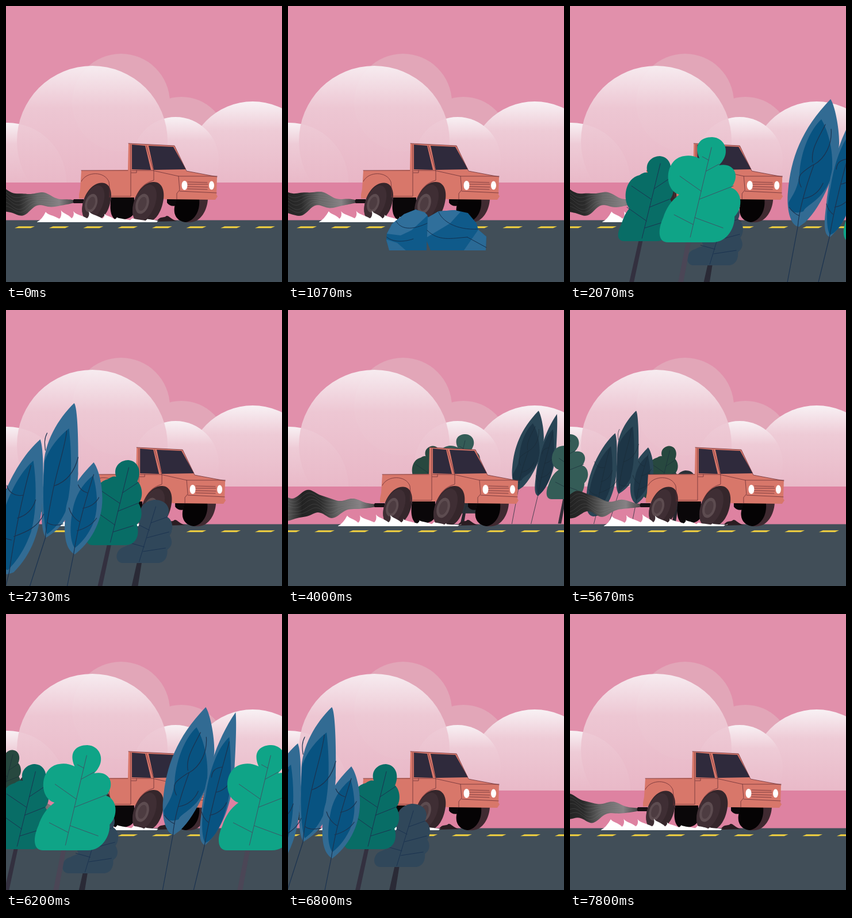
Animation of 480x480 px, one loop 7870 ms. Source, as an HTML page:

```html
<!DOCTYPE html>
<html lang="en">
<head>
<meta charset="utf-8">
<title>Pickup on the road</title>
<style>
  html, body { margin: 0; width: 100%; height: 100%; overflow: hidden; background: #e190ab; }
  svg { display: block; width: 100vw; height: 100vh; }
</style>
</head>
<body>
<svg id="stage" viewBox="0 0 480 480"></svg>
<script>
const LOOP = 7870, FRAME = LOOP / 118, DASH_GAP = 59.7;

const path = (d, fill) => `<path d="${d}" fill="${fill}"/>`;
const line = (d, color, width = 1) =>
  `<path d="${d}" fill="none" stroke="${color}" stroke-width="${width}" stroke-linecap="round" stroke-linejoin="round"/>`;
const ellipse = (x, y, rx, ry, fill, turn = 0) =>
  `<ellipse cx="${x}" cy="${y}" rx="${rx}" ry="${ry}" fill="${fill}" transform="rotate(${turn} ${x} ${y})"/>`;
const group = (x, y, body) => `<g transform="translate(${x} ${y})">${body}</g>`;

function clouds() {
  let defs = '', body = '';
  const puff = (x, y, r) => {
    const id = 'puff' + x;
    defs += `<linearGradient id="${id}" gradientUnits="userSpaceOnUse" x1="0" y1="${y - r}" x2="0" y2="307">
      <stop offset="0" stop-color="#f8f1f4"/><stop offset=".36" stop-color="#eecbd6"/>
      <stop offset="1" stop-color="#e9b9c8"/></linearGradient>`;
    body += ellipse(x, y, r, r, `url(#${id})`);
  };
  const haze = (x, y, r) => { body += ellipse(x, y, r, r, '#e2a6b8'); };
  haze(200, 168, 85);
  haze(305, 238, 80);
  puff(429, 280, 114);
  puff(295, 268, 75);
  puff(2, 306, 103);
  body += '<g opacity=".93">';
  puff(150, 235, 131);
  body += '</g>';
  return `<defs>${defs}<clipPath id="sky"><path d="M0 0H480V307H0Z"/></clipPath></defs>
    <g clip-path="url(#sky)">${body}</g>`;
}

function bigTree(p) {
  return path('M97 405L82 480H91L105 405Z', p.bigTrunk) +
    path('M64 411C47 411 46 390 56 368C61 352 70 338 84 328C56 320 58 266 92 261C102 259 110 261 119 265C108 240 122 228 141 228C163 229 171 252 160 268C158 272 155 274 153 277C176 272 188 290 179 308C178 311 176 313 174 316C194 322 195 352 180 366C181 384 168 411 142 411Z', p.big) +
    line('M140 246L103 402M131 287L153 275M122 322L85 296M119 336L178 313M111 368L160 386M108 380L75 363M135 268L124 262', p.bigVein);
}

function midTree(p) {
  return path('M177 405L160 480H168L184 405Z', p.trunk) +
    path('M152 409C138 409 138 396 146 380C150 368 152 362 160 352C148 336 152 300 178 294Q186 288 192 290C186 272 200 261 213 261C230 262 237 280 229 298C238 306 240 326 231 336C240 350 236 368 228 373C234 392 226 409 208 409Z', p.mid) +
    line('M214 274L182 404M203 318L230 300M198 336L164 313M195 350L230 336M190 374L156 350M187 386L222 375', p.vein);
}

function lowTree(p) {
  return path('M229 436L219 480H230L237 436Z', p.lowTrunk) +
    path('M204 440C188 440 190 416 206 412Q214 408 221 406C214 394 224 384 232 374C230 350 234 334 258 330C282 330 288 348 281 360C292 366 292 384 285 392C292 404 288 412 281 417C282 430 276 440 264 440Z', p.low) +
    line('M261 342L232 438M253 370L281 360M250 383L232 374M246 396L284 386M241 412L216 405M239 420L278 414', p.vein);
}

function leaf(p, outer, inner, veins) {
  return path(outer, p.leafEdge) + path(inner, p.leaf) + line(veins, p.vein, 1.2);
}

function plants(p) {
  const tallPair =
    leaf(p, 'M347 162C354 172 362 210 362 238C360 285 332 348 303 376L292 384C276 382 270 350 273 322C278 265 296 215 347 162Z',
      'M331 197C312 215 296 250 293 290C291 318 280 330 274 342C274 357 284 363 300 357C304 345 333 340 348 298C353 275 350 230 331 197Z',
      'M338 206C326 230 312 250 316 272M348 214C350 240 338 265 318 276C302 320 292 355 290 384L272 480M317 276C296 290 286 295 296 315M300 335C316 332 328 322 334 308M293 365C286 362 279 356 275 350') +
    leaf(p, 'M399 171C401 190 399 235 397 270C393 330 376 375 346 402C334 398 336 375 339 350C345 285 365 220 399 171Z',
      'M388 214C392 260 393 305 382 340C372 375 358 394 346 398C338 385 340 345 347 315C354 270 368 232 388 214Z',
      'M388 222C378 262 358 325 345 402L326 480M376 266C362 268 358 274 357 284M365 310C376 308 386 300 390 290M354 350C366 348 378 340 383 328M351 362C344 356 341 350 340 344');
  const trio =
    leaf(p, 'M119 162C125 168 127 230 126 285C122 350 100 378 70 396C58 380 64 335 66 275C66 230 92 188 119 162Z',
      'M110 206C115 250 116 300 105 348C95 372 82 382 72 390C62 360 66 280 68 262C76 240 92 220 110 206Z',
      'M106 210C104 235 90 275 82 315C76 345 70 375 69 396L42 480M126 256C120 280 108 298 84 306M72 214C66 225 68 235 69 244M100 372C88 376 78 374 73 370') +
    leaf(p, 'M60 225C66 240 66 290 64 330C60 385 45 425 14 456C-18 470 -26 440 -20 390C-14 330 20 260 60 225Z',
      'M48 262C54 300 54 350 44 386C32 420 16 440 4 452C-18 450 -18 410 -10 375C0 330 22 285 48 262Z',
      'M44 270C30 320 16 385 6 456L0 480M30 322C18 325 5 318 2 305M52 330C46 350 34 358 20 362M66 355C56 378 36 386 14 394M10 400C-2 398 -10 392 -14 384') +
    leaf(p, 'M153 265C160 274 168 300 168 328C168 370 146 406 120 425C104 416 100 392 104 352C106 318 130 288 153 265Z',
      'M152 288C160 318 162 350 150 376C140 396 130 406 120 414C110 400 112 370 117 345C122 320 136 300 152 288Z',
      'M153 286C144 315 126 370 118 425L107 480M142 318C134 316 128 310 126 304M162 326C156 338 144 343 134 345M128 368C118 362 112 352 110 344M158 362C150 374 138 380 124 384');
  return group(-163, 0, midTree(p)) + group(-95, 11, lowTree(p)) + bigTree(p) + tallPair +
    group(320, 0, bigTree(p)) +
    group(527, 0, lowTree(p) + midTree(p) + trio);
}

function rocks() {
  const ink = '#12304f';
  return path('M172 396L181 379L202 362L222 354L238 359L248 372L242 390L241 425H177L171 408Z', '#0f5a8a') +
    path('M172 396L181 379L202 362L222 354L238 359L243 364L215 390L196 399Z', '#306f9b') +
    path('M176 425L171 406L190 412L205 425Z', '#2a6a96') +
    line('M188 374C196 388 214 392 246 376M172 402C184 412 204 410 218 405', ink) +
    path('M243 368L262 357L290 355L313 360L328 378L331 389L345 401L344 425H248L241 408Z', '#0f5a8a') +
    path('M243 368L262 357L290 355L300 358L282 378L262 390L242 402Z', '#306f9b') +
    path('M306 425L331 389L345 401L344 425Z', '#2a6a96') +
    line('M262 358C268 374 292 390 330 388M242 390C262 410 284 404 312 402M312 402L345 420', ink);
}

function wheel(x, y, s) {
  return group(x, y, `<g transform="scale(${s})">` +
    path('M-19 12C-18 -12 -2 -37 18 -37C34 -37 38 -18 34 -2C30 18 20 31 8 33H-4C-14 32 -19 24 -19 12Z', '#35262b') +
    ellipse(2, 0, 18, 34, '#3f2e34', 22) +
    ellipse(-2, 1, 11, 18, '#5d4c50', 18) +
    ellipse(-2, 1, 7, 12.5, '#4d3c41', 18) + '</g>');
}

function truck() {
  const ink = '#6b3036', paint = '#d8776a', glass = '#2f2a3c';
  return path('M183 332H223V360C218 370 205 373 190 371C181 366 180 350 183 332Z', '#0a0709') +
    path('M262 375C268 364 274 370 279 365C284 364 286 371 298 374Z', '#2a1d22') +
    path('M280 336H299V345C292 350 284 348 280 342Z', '#0a0709') +
    path('M296 336H351C350 356 338 375 322 376C302 378 292 368 293 352Z', '#402a31') +
    path('M296 336H336C338 356 328 374 312 376C298 374 291 364 293 350Z', '#050304') +
    path('M118 336H135V343H118Q115 340 118 336Z', '#191115') +
    path('M131 286L212 285L213 239L293 243L314 287L367 297L366 328L368 331L364 337L276 336L264 333H180L127 335L127 328L129 318Z', paint) +
    wheel(150, 342, .93) + wheel(239, 343, 1) +
    path('M219 241L242 243L252 285L219 284Z', glass) +
    path('M248 243L291 245L313 284L257 285Z', glass) +
    line('M213 239L293 243L314 287L367 297M217 241V331H180M244 243L257 287V303C240 308 231 318 227 332M131 305C140 287 172 287 179 306Q181 318 180 333M131 286H212M219 286H255L300 296H367M300 296L302 320L297 326V336M218 290H227V286M302 322L366 325', ink, .8) +
    line('M316 306L350 307M315 310H351M315 314L351 315M316 318L350 319', ink, .8) +
    ellipse(310.5, 312, 5, 8, '#fff') + ellipse(357.5, 312, 4.5, 7.5, '#fff');
}

const near = { big: '#0fa487', mid: '#086d66', low: '#30475a', leaf: '#085381', leafEdge: '#326b93',
  vein: '#1b3350', bigVein: '#3d5566', trunk: '#33303f', bigTrunk: '#4b4656', lowTrunk: '#2a2a36' };
const far = { big: '#345c57', mid: '#27483f', low: '#2b3138', leaf: '#1d3546', leafEdge: '#2a4656',
  vein: '#1a2c38', bigVein: '#1a2c38', trunk: '#33303a', bigTrunk: '#33303a', lowTrunk: '#25252c' };

const dash = x => `M${x} 386.3L${x + 7} 383.2H${x + 35}L${x + 28} 386.3Z`;
const dashes = Array.from({ length: 11 }, (_, i) => dash((i - 1) * DASH_GAP)).join('');

document.getElementById('stage').innerHTML = `
  <defs><linearGradient id="fume" gradientUnits="userSpaceOnUse" x1="-40" y1="0" x2="118" y2="0">
    <stop offset="0" stop-color="#666"/><stop offset=".2" stop-color="#222"/><stop offset=".4" stop-color="#2b2b2b"/>
    <stop offset=".6" stop-color="#666"/><stop offset=".84" stop-color="#858083"/><stop offset="1" stop-color="#3b383a"/>
  </linearGradient></defs>
  <path d="M0 0H480V480H0Z" fill="#e190ab"/>
  <path d="M0 307H480V374H0Z" fill="#de82a1"/>
  ${clouds()}
  <g id="far">${plants(far)}</g>
  <path d="M0 372.4H480V480H0Z" fill="#414e58"/>
  <path id="dashes" d="${dashes}" fill="#f3d23f"/>
  <g id="truck">
    <path id="smoke" fill="url(#fume)"/>
    <path id="wisps" fill="none" stroke="#999" stroke-width="1" opacity=".18"/>
    ${truck()}
    <path id="dust" fill="#fff"/>
  </g>
  <g id="rocks">${rocks()}</g>
  <g id="near">${plants(near)}</g>`;

const $ = id => document.getElementById(id);
const ease = u => (1 - Math.cos(Math.PI * Math.min(1, Math.max(0, u)))) / 2;

// Ribbon of smoke: two edges around a travelling wave, widening away from the exhaust.
function smoke(t) {
  const phase = t / LOOP * Math.PI * 2 * 23;
  const edge = (u, side) => {
    const spread = Math.min(1, u / 80);
    const sway = -6 * Math.cos((u - 56) / 12 - phase) * spread;
    const ripple = 2.5 * Math.sin(u / 7 - phase + side * 1.9) * spread;
    return 340 + sway + side * (2.5 + Math.min(18, u * .16)) + ripple;
  };
  const trace = side => Array.from({ length: 55 }, (_, i) =>
    `${118 - i * 3} ${edge(i * 3, side).toFixed(1)}`);
  $('smoke').setAttribute('d', 'M' + trace(-1).concat(trace(1).reverse()).join('L') + 'Z');
  $('wisps').setAttribute('d', [-.7, -.4, -.1, .3, .6].map(s => 'M' + trace(s).join('L')).join(''));
}

// Spray behind the wheels: fins with the tip on the left and a rounded back.
function dust(frame) {
  const heights = [17, 19, 19, 18, 13, 9, 6, 4];
  const wobble = i => Math.sin(frame * 1.3 + i * 2.1);
  const tipX = i => 69 + i * 25 + wobble(i) * 2;
  let d = 'M54 375.5Q63 371 ';
  heights.forEach((height, i) => {
    const x = tipX(i), y = 375 - height - wobble(i), next = tipX(i + 1), valley = 375 - height * .3;
    d += `${x} ${y}C${x + 3} ${y + height * .3} ${x + 13} ${y + height * .35} ${next - 3} ${valley}Q${next + 2} ${valley - 4} `;
  });
  $('dust').setAttribute('d', d + '262 376H54Z');
}

const shift = (id, x) => $(id).setAttribute('transform', `translate(${x.toFixed(2)} 0)`);

function draw(now) {
  const frame = Math.floor((now % LOOP) / FRAME + .1) % 118, t = frame * FRAME;

  shift('truck', 33 * (t < 4000 ? ease((t - 1680) / 2320) : 1 - ease((t - 4000) / 2230)));
  shift('dashes', (frame + 1) % 7 < 4 ? 15 : 46);
  shift('rocks', -.95 * (t - 1067));
  shift('near', t < 4400 ? -527 - .95 * (t - 2734) : -.95 * (t - 6203));
  $('far').setAttribute('transform', `translate(${(221.5 - .303 * (t - 4002)).toFixed(2)} 75.4) scale(.617)`);
  smoke(t);
  dust(frame);
}

const start = performance.now();
function tick() {
  draw(performance.now() - start);
  requestAnimationFrame(tick);
}
draw(0);
requestAnimationFrame(tick);
</script>
</body>
</html>
```
